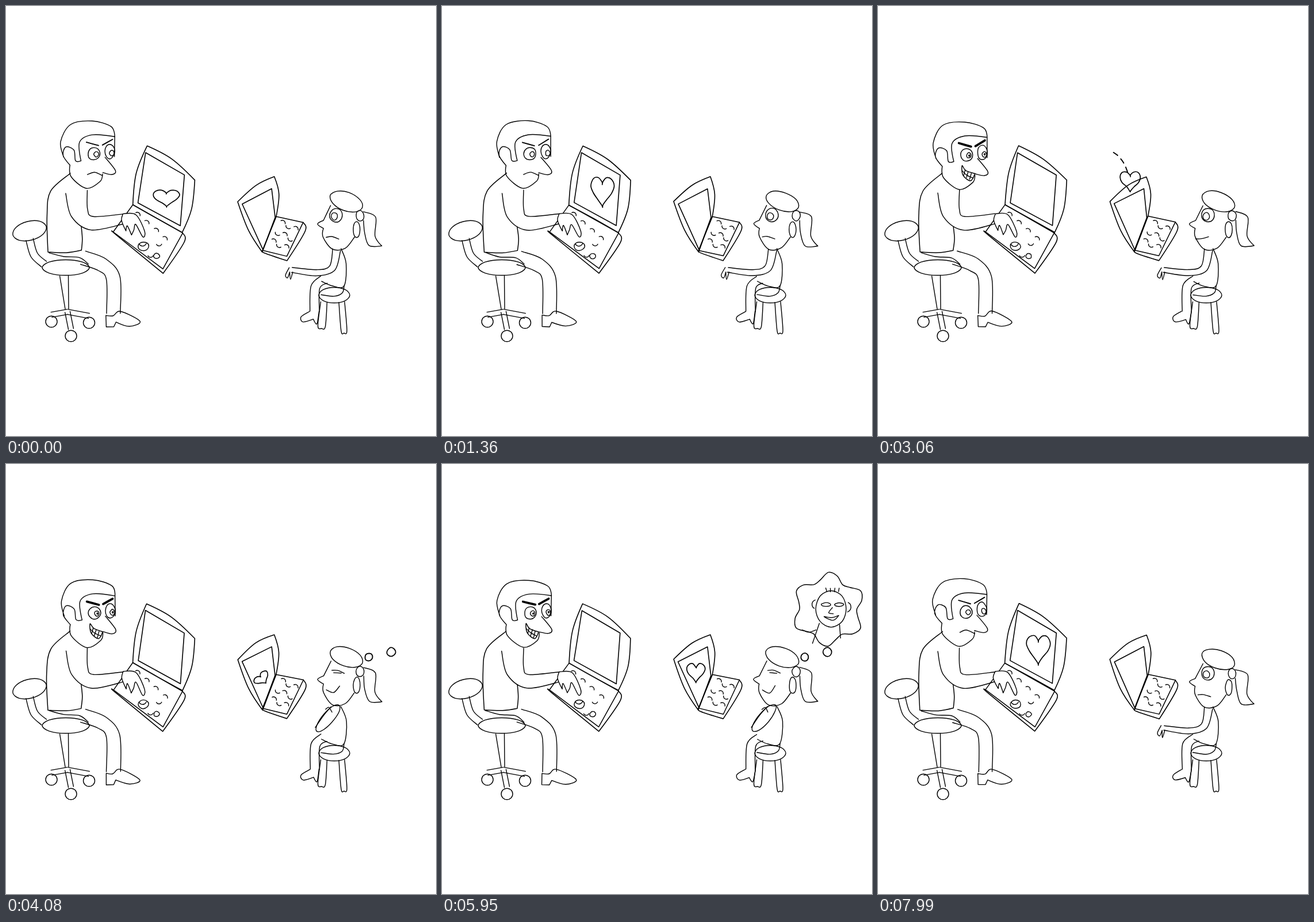
Animation of 748 by 748 pixels, one loop 8160 ms. Source, as an HTML page with a canvas:

```html
<!DOCTYPE html>
<html lang="en">
<head>
<meta charset="utf-8">
<title>Heart by laptop</title>
<style>
  html, body { margin: 0; width: 100%; height: 100%; overflow: hidden; background: #fff; }
  canvas { display: block; }
</style>
</head>
<body>
<canvas id="stage" width="748" height="748"></canvas>
<script>
const ctx = document.getElementById('stage').getContext('2d');
const STEP = 170, STEPS = 48;
let step = 0, wobble = 0;

const clamp = v => Math.max(0, Math.min(1, v));
const mix = (a, b, u) => a + (b - a) * u;
const mixPoint = (a, b, u) => [mix(a[0], b[0], u), mix(a[1], b[1], u)];
const range = n => [...Array(n).keys()];
const during = (from, to) => step >= from && step < to;

// Hand-drawn line boil: a seeded offset for each point and step.
function noise(x, y) {
  const v = Math.sin(x * 12.9898 + y * 78.233 + step * 37.719) * 43758.5453;
  return (v - Math.floor(v) - .5) * wobble;
}

// Smooth line through points; a third value marks a corner.
function trace(points, { closed = false, width = 1.4, fill } = {}) {
  const n = points.length;
  const p = points.map(([x, y, corner]) => ({ x: x + noise(x, y), y: y + noise(y, x), corner }));
  const at = i => closed ? p[(i + n) % n] : p[Math.max(0, Math.min(n - 1, i))];
  const pull = (i, axis) => at(i).corner ? 0 : (at(i + 1)[axis] - at(i - 1)[axis]) / 6;
  ctx.beginPath();
  ctx.moveTo(p[0].x, p[0].y);
  for (let i = 0; i < (closed ? n : n - 1); i++) {
    const a = at(i), b = at(i + 1);
    ctx.bezierCurveTo(a.x + pull(i, 'x'), a.y + pull(i, 'y'),
      b.x - pull(i + 1, 'x'), b.y - pull(i + 1, 'y'), b.x, b.y);
  }
  if (closed) ctx.closePath();
  if (fill) { ctx.fillStyle = fill; ctx.fill(); }
  ctx.lineWidth = width;
  ctx.stroke();
}

// "x,y" words, with "!" for a corner.
const line = (text, options) => trace(text.split(' ').map(word =>
  [...word.replace('!', '').split(',').map(Number), word.endsWith('!')]), options);

// Closed line around a centre: radii, tilt and an optional radius factor.
function ring(x, y, rx, ry, { tilt = 0, count = 8, factor = () => 1, width = 1.4 } = {}) {
  trace(range(count).map(i => {
    const a = i / count * 2 * Math.PI, f = factor(a);
    const u = rx * f * Math.cos(a), v = ry * f * Math.sin(a);
    return [x + u * Math.cos(tilt) - v * Math.sin(tilt), y + u * Math.sin(tilt) + v * Math.cos(tilt)];
  }), { closed: true, width });
}

// Two outlines beside a centre line, from width w0 to w1, with an optional round end.
function limb(points, w0, w1 = w0, round = false) {
  const last = points.length - 1;
  const side = sign => points.map(([x, y], i) => {
    const a = points[Math.max(0, i - 1)], b = points[Math.min(last, i + 1)];
    const dx = b[0] - a[0], dy = b[1] - a[1], k = sign * mix(w0, w1, i / last) / 2 / Math.hypot(dx, dy);
    return [x + dy * k, y - dx * k];
  });
  if (round) trace([...side(1), points[last].map((v, i) => v + (i ? 4 : 0)), ...side(-1).reverse()]);
  else [1, -1].forEach(sign => trace(side(sign)));
}

function arc(x, y, r, from) {
  ctx.beginPath();
  ctx.arc(x + noise(x, y), y + noise(y, x), r, from, from + 2.3);
  ctx.lineWidth = 1.4;
  ctx.stroke();
}

function heart(x, y, w, h, tilt = 0) {
  const c = Math.cos(tilt), s = Math.sin(tilt);
  trace(range(16).map(i => {
    const a = i / 16 * 2 * Math.PI;
    const u = Math.sin(a) ** 3 / 2 * w;
    const v = -(13 * Math.cos(a) - 5 * Math.cos(2 * a) - 2 * Math.cos(3 * a) - Math.cos(4 * a) + 2.5) / 29 * h;
    return [x + u * c - v * s, y + u * s + v * c, i % 8 === 0];
  }), { closed: true, width: 1.7 });
}

function drawSeats() {
  ring(41, 391, 30, 16.5, { tilt: -.25 });
  limb([[41, 406], [49, 433], [66, 449]], 13);
  ring(104, 455, 41, 13.5);
  limb([[101, 469], [106, 527]], 15, 6);
  for (const [x, y] of [[79, 549], [113, 574], [144.5, 551]]) {
    ring(x, y, 10, 9.8);
    limb([[107, 532], [x, y - 12]], 9);
  }
  ring(571, 503, 27, 13.5);
  limb([[553, 515], [549, 557]], 11, 13, true);
  limb([[584, 515], [588, 565]], 10, 10, true);
}

// Screen and deck corners run clockwise from the back left.
function laptop(screen, glass, deck) {
  const middle = mixPoint(screen[0], screen[2], .5);
  const rim = screen.flatMap((p, i) => {
    const m = mixPoint(p, screen[(i + 1) % 4], .5);
    const k = i === 2 ? 0 : 7 / Math.hypot(m[0] - middle[0], m[1] - middle[1]);
    return [[...p, true], [m[0] + (m[0] - middle[0]) * k, m[1] + (m[1] - middle[1]) * k]];
  });
  const sharp = points => points.map(p => [...p, true]);
  trace(rim, { closed: true, width: 1.6 });
  trace(sharp(glass), { closed: true, width: 1.6 });
  trace(sharp(deck), { closed: true, width: 1.5 });
  const [, right, front, left] = deck;
  trace([left, [left[0] + 4, left[1] + 5], [front[0], front[1] + 8, true], [right[0] + 3, right[1] + 16], right], { width: 1.6 });
}

function drawLaptops() {
  laptop([[245, 243], [328, 303], [307, 394], [221, 346]],
    [[243, 255], [310, 294], [303, 382], [230, 342]],
    [[221, 346], [307, 395], [273, 457], [187, 393]]);
  range(4).forEach(i => arc(228 + 16 * i, 364 + 14 * i, 5, 4.2));
  [0, 1].forEach(i => arc(266 - 15 * i, 412 + 20 * i, 5, .4));
  ring(239, 418, 9, 7.5);
  arc(238, 411, 7, .4);
  ring(262, 435, 5, 4.5);

  laptop([[403, 340], [467, 297], [470, 366], [446, 428]],
    [[411, 344], [462, 318], [468, 368], [447, 424]],
    [[470, 366], [517, 376], [489, 435], [446, 425]]);
  for (const i of range(3)) for (const j of range(3))
    arc(481 + 11 * i - 8 * j, 378 + 5 * i + 16 * j, 5, (i + j) % 2 ? 1 : 4.2);
}

function drawMan() {
  const smile = during(11, 17), grin = during(17, 44);
  line('112,291 78,322 71,365 73,428! 105,429 131,425! 133,405 131,384', { width: 1.5 });
  limb([[123, 323], [128, 360], [150, 378], [205, 370]], 38, 17);
  line('204,361 226,363 241,392 238,402 226,380 222,390 218,398! 211,382 209,391! 201,373 204,361', { fill: '#fff' });
  line('75,429 100,436 128,438 143,449');
  limb([[134, 438], [167, 450], [186, 473], [187, 535]], 24);
  line('174,538 174,558! 187,558! 191,550! 215,557 233,549 199,531 186,539 174,538');

  ctx.save();
  if (smile || grin) ctx.translate(1, 2);
  line('100,263 95,236 112,206 150,200 183,210 189,227! 150,224 128,237 131,269! 121,269 118,250 104,245 99,260 111,277! 113,297 140,317 164,305 168,292');
  line('189,227 189,262');
  line('172,263 190,286 184,293 168,290');
  ring(153, 257, 10.5, 11);
  ring(157, 258, 4, 4.5);
  ring(180.5, 253, 8.5, 12.5);
  ring(184, 256, 3.8, 5);
  const browWidth = grin ? 3.8 : smile ? 2.2 : 1.9;
  line('140,237 161,243', { width: browWidth });
  line('168,242 185,232', { width: browWidth });
  if (grin) {
    ring(158, 258, 1, 1.3);
    ring(184.5, 256, 1, 1.3);
    line('145,276 152,284 167,290! 160,302 147,292', { closed: true, width: 1.5 });
    range(3).forEach(i => line(`${151 + 5 * i},${283 + 3 * i} ${148 + 5 * i},${293 + 3.5 * i}`));
    line('146,285 153,292 164,297');
  } else if (smile) {
    line('140,284 157,290 167,292! 156,302');
  } else {
    line('142,293 154,289 168,295');
  }
  ctx.restore();
}

function drawGirl() {
  const happy = during(22, 37), typing = during(37, 44);
  limb([[553, 476], [538, 489], [537, 531]], 16);
  line('528,531 513,541 517,550 535,545! 541,553 545,531');
  line('548,502 570,505 585,499 588,486');
  line('583,422 592,448 588,487 567,487 549,479');

  ctx.save();
  if (happy) ctx.translate(0, -4);
  if (typing) ctx.translate(-5, -5);
  ring(592, 340, 30, 16, { tilt: .35 });
  line('565,347 552,373! 542,379 552,387! 552,402 568,423 590,421 606,402');
  ring(610, 389, 6, 14);
  ring(616, 365, 7, 9);
  line('622,358 643,367 642,400 654,417! 632,417 624,395 622,373');
  if (happy) {
    line('567,363 577,363 588,368');
    line('570,367 583,368');
    line('557,397 570,402 580,390');
  } else {
    const size = typing ? .75 : 1;
    ring(574, 364, 11 * size, 12 * size);
    ring(571, 366, 5.5 * size, 6.5 * size);
    line(typing ? '552,405 562,408 570,401' : during(11, 22) ? '553,405 563,405 575,401' : '557,402 566,401 579,405');
  }
  ctx.restore();

  if (happy) {
    ring(560, 442, 30, 10, { tilt: -.85 });
    line('566,422 552,437 538,458');
    line('556,427 562,423 567,432');
  } else if (typing) {
    limb([[572, 430], [545, 438], [500, 423]], 20, 10);
    line('502,418 488,412! 493,419 486,420! 492,424 487,427! 500,430');
    line('525,442 548,441! 550,446 560,437');
    [0, 1].forEach(i => ring(535 + 22 * i, 457, 3, 2.7));
  } else {
    limb([[575, 424], [567, 456], [540, 464], [497, 459]], 14, 8);
    line('493,455 486,468 490,473 494,463! 495,476 499,463');
  }
}

// The heart's curve from one screen to the other, u from 0 to 1.
function flight(u) {
  const start = [298, 263], peak = [450, 195], end = [442, 364];
  return mixPoint(mixPoint(start, peak, u), mixPoint(peak, end, u), u);
}

function drawHearts() {
  if (step < 11 || step >= 44) {
    const u = step >= 44 ? 1 : clamp(step / 4);
    heart(279, mix(335, 324, u), mix(46, 41, u), mix(30, 52, u));
  } else if (step < 21) {
    const u = (step - 10) / 10, size = mix(44, 30, clamp(u * 2 - 1));
    ctx.setLineDash([9, 8]);
    trace(range(6).map(i => flight(mix(Math.max(0, u - .3), u - .08, i / 5))), { width: 1.9 });
    ctx.setLineDash([]);
    heart(...flight(u), size, size);
  } else {
    const u = clamp((step - 24) / 3);
    heart(mix(446, 442, u), mix(374, 364, u), mix(29, 32, u), mix(19, 34, u), mix(-.7, 0, u));
  }
}

function drawThought() {
  if (during(23, 38)) {
    ring(631, 336, 6.8, 6.8, { width: 1.9 });
    if (step >= 24) ring(670, 327, 7.5, 7.5, { width: 1.8 });
    if (step < 27) return;
    ring(672, 253, 57, 57, { count: 24, factor: a => 1 + .14 * Math.cos(6 * (a + 1.5)), width: 1.5 });
    ring(677, 252, 26.5, 31.5);
    arc(652, 244, 8, 2.1);
    arc(702, 249, 9, 5.2);
    [668, 691].forEach(x => ring(x, 244.5, 8, 3));
    range(4).forEach(i => line(`${669 + 7 * i},222 ${668 + 7.5 * i},216`));
    line('679,250 673,259 680,261');
    line('665,265 678,267 690,263! 680,272', { closed: true });
    line('656,277 644,312');
    line('692,280 693,303');
    line('627,289 638,293 651,289');
  } else if (during(38, 42)) {
    // The burst cloud leaves drops that drift apart.
    const spread = 1 + (step - 40) * .25;
    for (const [dx, dy, r] of [[-20, 45, 3.5], [-1, 5, 7], [2, -11, 3], [12, -3, 1.8], [-29, -27, 1], [22, -36, 2]])
      ring(672 + dx * spread, 285 + dy * spread, r, r * .95);
  }
}

function frame(now) {
  step = Math.floor(now / STEP) % STEPS;
  ctx.clearRect(0, 0, 748, 748);
  ctx.strokeStyle = '#000';
  ctx.lineCap = ctx.lineJoin = 'round';
  wobble = 0;
  drawSeats();
  wobble = 1;
  drawLaptops();
  drawMan();
  drawGirl();
  drawHearts();
  drawThought();
}

const start = performance.now();
(function loop() {
  frame(performance.now() - start);
  requestAnimationFrame(loop);
})();
</script>
</body>
</html>
```
